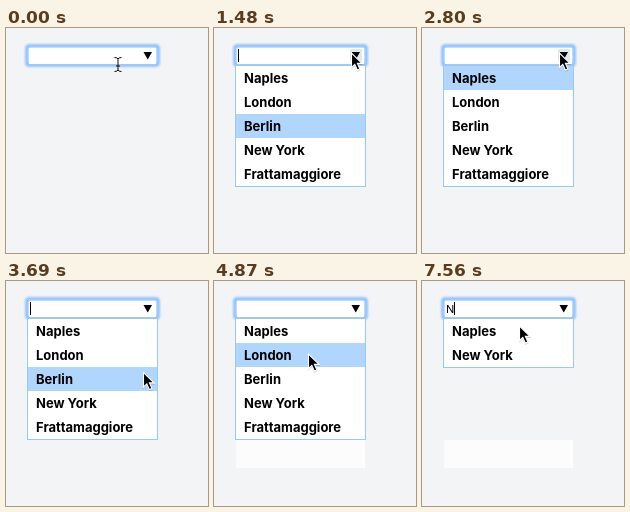
An HTML page that plays this animation: 202 by 225 pixels, repeating every 8 s.

```html
<!DOCTYPE html>
<html lang="en">
<head>
<meta charset="utf-8">
<title>Combo box</title>
<style>
  html, body { margin: 0; width: 100%; height: 100%; overflow: hidden; background: #f3f4f6; }
  svg { display: block; width: 202px; height: 225px; }
  .item { font: bold 13px Inter, sans-serif; }
  .typed { font: 11px Inter, sans-serif; }
</style>
</head>
<body>
<svg viewBox="0 0 202 225">
  <defs>
    <filter id="soft" x="-20%" y="-60%" width="140%" height="220%"><feGaussianBlur stdDeviation=".8"/></filter>
    <filter id="shade" x="-50%" y="-50%" width="200%" height="200%">
      <feDropShadow dx="0" dy=".7" stdDeviation=".7" flood-opacity=".3"/>
    </filter>
  </defs>
  <rect id="patch" x="22" y="159" width="129" height="28" fill="#fcfcfd"/>
  <rect x="21" y="18" width="131" height="19" rx="2" fill="#fff" stroke="#87c0fd" stroke-width="3.6" filter="url(#soft)"/>
  <rect x="23" y="20" width="127" height="16" fill="#fff"/>
  <rect id="hover" x="136" y="21" width="12" height="13" rx="1" fill="#e6e6e6"/>
  <path d="M137.5 24h8.5l-4.25 7.5z"/>
  <text id="typed" class="typed" x="24" y="32"></text>
  <rect id="caret" y="21" width="1" height="13"/>
  <g id="list">
    <rect id="panel" x="21.5" y="37.5" width="130" fill="#fff" stroke="#9cc8f0"/>
    <rect id="bar" x="22" width="129" height="24" fill="#b1d6fe"/>
    <g id="rows"></g>
  </g>
  <g id="pointer">
    <path id="arrow" d="M0 0V14.5L3.3 11.4L5.8 17L8.3 15.9L5.9 10.4H10.5Z" stroke="#fff" stroke-width="1.1" filter="url(#shade)"/>
    <path id="beam" d="M-3.5-6.5Q-.5-6.5 0-5Q.5-6.5 3.5-6.5M0-5V6M-3.5 7.5Q-.5 7.5 0 6Q.5 7.5 3.5 7.5M-2 2H2" fill="none" stroke="#111"/>
  </g>
</svg>
<script>
const $ = id => document.getElementById(id);
const LOOP = 8000, ROW = 24, TOP = 38;
const cities = ["Naples", "London", "Berlin", "New York", "Frattamaggiore"];
const none = -1;

// Each entry holds only what changes at that moment.
const start = { text: "", caret: false, open: false, row: none, mouse: [112, 36], beam: true, patch: false };
const timeline = [
  [150, { caret: true, mouse: [124, 34] }],
  [290, { mouse: [135, 30] }],
  [440, { mouse: [137.5, 25], beam: false }],
  [740, { open: true }],
  [890, { caret: false }],
  [1190, { row: 0 }],
  [1330, { row: 1, caret: true }],
  [1480, { row: 2 }],
  [1770, { row: 3, caret: false }],
  [1920, { row: 4 }],
  [2060, { row: 3 }],
  [2210, { caret: true }],
  [2360, { row: 2 }],
  [2500, { row: 1 }],
  [2650, { row: 0 }],
  [2800, { caret: false }],
  [2950, { row: 1 }],
  [3100, { row: 2 }],
  [3390, { row: 3, caret: true }],
  [3690, { row: 2, mouse: [137.5, 91.5] }],
  [3830, { row: 3, mouse: [136, 115], caret: false }],
  [3980, { row: 4, mouse: [132, 142] }],
  [4130, { mouse: [127, 168], patch: true }],
  [4280, { mouse: [122, 166], caret: true }],
  [4430, { mouse: [115, 158] }],
  [4570, { mouse: [108, 150] }],
  [4730, { mouse: [102, 143] }],
  [4870, { row: 1, mouse: [94.5, 73], caret: false }],
  [5020, { mouse: [96, 64] }],
  [5320, { caret: true }],
  [5620, { text: "London", open: false, row: none }],
  [5920, { mouse: [97, 56] }],
  [6070, { mouse: [97.5, 45] }],
  [6220, { text: "Londo", open: true }],
  [6370, { text: "Lond" }],
  [6670, { text: "Lon" }],
  [6820, { text: "Lo" }],
  [6970, { text: "L" }],
  [7110, { caret: false }],
  [7410, { text: "", open: false, caret: true }],
  [7560, { text: "N", open: true }]
];

const labels = cities.map(city => {
  const label = document.createElementNS("http://www.w3.org/2000/svg", "text");
  label.setAttribute("class", "item");
  label.setAttribute("x", 30);
  label.textContent = city;
  $("rows").append(label);
  return label;
});

const show = (node, visible) => node.style.display = visible ? "" : "none";

function draw(time) {
  const state = Object.assign({}, start, ...timeline.filter(([at]) => at <= time).map(([, change]) => change));
  $("typed").textContent = state.text;
  $("caret").setAttribute("x", 24 + Math.round(state.text ? $("typed").getComputedTextLength() : 0));
  show($("caret"), state.caret);

  let count = 0;
  labels.forEach((label, i) => {
    const matches = cities[i].startsWith(state.text[0] || "");
    show(label, matches);
    if (matches) label.setAttribute("y", TOP + ROW * count++ + 17);
  });
  $("panel").setAttribute("height", ROW * count + 1);
  $("bar").setAttribute("y", TOP + ROW * state.row);
  show($("bar"), state.row !== none);
  show($("list"), state.open);

  const [x, y] = state.mouse;
  $("pointer").setAttribute("transform", `translate(${x} ${y})`);
  show($("hover"), x > 136 && y < TOP);
  show($("arrow"), !state.beam);
  show($("beam"), state.beam);
  show($("patch"), state.patch);
}

const origin = performance.now();
function tick() {
  draw((performance.now() - origin) % LOOP);
  requestAnimationFrame(tick);
}
tick();
</script>
</body>
</html>
```
